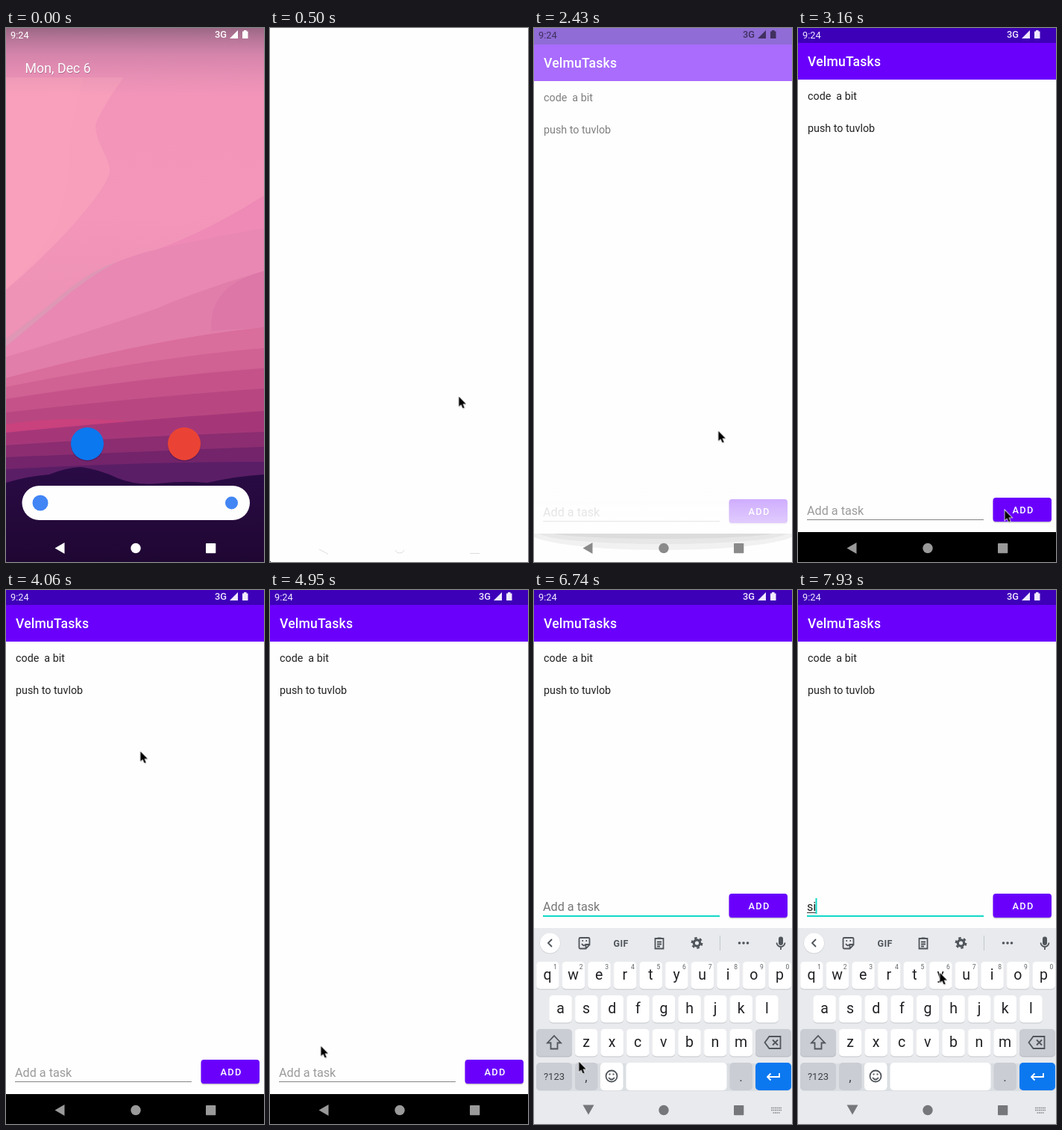
Animation of 346 by 714 pixels, one loop 8 s. Source, as an HTML page without scripts:

```html
<!DOCTYPE html>
<html lang="en">
<head>
<meta charset="utf-8">
<title>To-do app</title>
<style>
html, body { margin: 0; width: 100%; height: 100%; overflow: hidden; background: #fefefe; }
svg { display: block; width: 100vw; height: 100vh; font-family: Roboto, sans-serif; }
.line { fill: none; stroke: #50555b; stroke-width: 1.8; }
.med { font-weight: 500; }
.letters { font-size: 19.5px; fill: #202124; text-anchor: middle; }
.hints { font-size: 8.5px; fill: #5f6368; text-anchor: middle; }

.home, .ghost, .app, .fade, .status, .nav, .navbar, .back, .down,
.row, .hint, .rest, .focus, .typed, .keys, .cursor { animation: 8s step-end infinite; }

.home { animation-name: home; }
@keyframes home { 0% { opacity: 1; } 6.25%, 100% { opacity: 0; } }
.ghost { animation-name: ghost; }
@keyframes ghost { 0% { opacity: 0; } 6.25% { opacity: 1; } 8%, 100% { opacity: 0; } }

.app { animation-name: app; }
@keyframes app {
  0% { opacity: 0; }
  30.375% { opacity: .58; transform: translate(0, 2px); }
  32.25%, 100% { opacity: 1; transform: none; }
}
.fade { animation-name: fade; }
@keyframes fade { 0% { opacity: 0; } 30.375% { opacity: 1; } 32.25%, 100% { opacity: 0; } }

.status { animation-name: status; }
@keyframes status {
  0% { fill: #fff; }
  6.25% { fill: transparent; }
  13.625% { fill: #666; }
  30.375% { fill: #40305f; }
  32.25%, 100% { fill: #f1eaff; }
}
.nav { animation-name: nav; }
@keyframes nav {
  0% { fill: #fff; }
  6.25% { fill: transparent; }
  13.625% { fill: #8a8a8a; }
  32.25% { fill: #9a9a9a; }
  80.5%, 100% { fill: #75777a; }
}
.navbar { animation-name: navbar; }
@keyframes navbar {
  0% { fill: transparent; }
  32.25% { fill: #000; }
  80.5%, 100% { fill: #e8eaed; }
}
.back { animation-name: back; }
@keyframes back { 0% { opacity: 1; } 80.5%, 100% { opacity: 0; } }
.down { animation-name: down; }
@keyframes down { 0% { opacity: 0; } 80.5%, 100% { opacity: 1; } }

.row { animation-name: row; }
@keyframes row { 0% { transform: none; } 80.5%, 100% { transform: translate(0, -222px); } }
.hint { animation-name: hint; }
@keyframes hint {
  0% { fill: #9b9b9b; opacity: 1; }
  78.625% { fill: #777; opacity: 1; }
  99.125%, 100% { opacity: 0; }
}
.rest { animation-name: rest; }
@keyframes rest { 0% { opacity: 1; } 78.625%, 100% { opacity: 0; } }
.focus { animation-name: focus; }
@keyframes focus { 0% { opacity: 0; } 78.625%, 100% { opacity: 1; } }
.typed { animation-name: typed; }
@keyframes typed { 0% { opacity: 0; } 99.125%, 100% { opacity: 1; } }

.keys { animation-name: keys; }
@keyframes keys {
  0% { transform: translate(0, 270px); }
  80.5% { transform: translate(0, 110px); }
  82.375% { transform: translate(0, 20px); }
  84.25%, 100% { transform: none; }
}

.cursor { animation-name: cursor; }
@keyframes cursor {
  0% { transform: translate(-40px, 0); }
  6.25% { transform: translate(253px, 492px); }
  8% { transform: translate(251px, 508px); }
  13.625%, 30.375% { transform: translate(247px, 538px); }
  32.25% { transform: translate(249px, 556px); }
  34.125% { transform: translate(256px, 582px); }
  36% { transform: translate(266px, 612px); }
  37.625% { transform: translate(274px, 635px); }
  39.5% { transform: translate(277px, 644px); }
  41.375% { transform: translate(271px, 664px); }
  43.25% { transform: translate(258px, 681px); }
  45.125% { transform: translate(176px, 393px); }
  48.875% { transform: translate(183px, 300px); }
  50.75% { transform: translate(180px, 215px); }
  52.625% { transform: translate(160px, 179px); }
  54.5% { transform: translate(137px, 225px); }
  56.25% { transform: translate(112px, 340px); }
  58.125% { transform: translate(90px, 465px); }
  60% { transform: translate(74px, 565px); }
  61.875% { transform: translate(68px, 609px); }
  63.75% { transform: translate(63px, 634px); }
  65.625% { transform: translate(56px, 657px); }
  67.5% { transform: translate(51px, 651px); }
  69.25% { transform: translate(51px, 641px); }
  84.25% { transform: translate(60px, 630px); }
  86% { transform: translate(95px, 596px); }
  87.875% { transform: translate(140px, 555px); }
  89.75% { transform: translate(175px, 525px); }
  91.625%, 100% { transform: translate(190px, 511px); }
}
</style>
</head>
<body>
<svg viewBox="0 0 346 714">
  <defs>
    <linearGradient id="sky" x2="0" y2="1">
      <stop offset="0" stop-color="#f294b9"/>
      <stop offset=".35" stop-color="#f396b9"/>
      <stop offset=".5" stop-color="#ee92b6"/>
    </linearGradient>
    <linearGradient id="scrim" x2="0" y2="1">
      <stop offset="0" stop-color="#54445a" stop-opacity=".55"/>
      <stop offset=".4" stop-color="#8a5c86" stop-opacity=".28"/>
      <stop offset="1" stop-color="#b070a0" stop-opacity="0"/>
    </linearGradient>
    <linearGradient id="ground" x2="0" y2="1">
      <stop offset="0" stop-color="#2a0b45"/>
      <stop offset="1" stop-color="#1f0733"/>
    </linearGradient>
    <linearGradient id="veil" x2="0" y2="1">
      <stop offset="0" stop-color="#fefefe" stop-opacity=".35"/>
      <stop offset="1" stop-color="#fefefe" stop-opacity=".75"/>
    </linearGradient>
    <pattern id="caps" width="34.6" height="45" patternUnits="userSpaceOnUse">
      <rect x=".3" y="1" width="30.6" height="36.4" rx="5" fill="#c3c6ca"/>
      <rect x=".3" width="30.6" height="36.4" rx="5" fill="#fff"/>
    </pattern>
    <clipPath id="foot"><path d="M0 676H346V714H0z"/></clipPath>
  </defs>

  <rect width="346" height="714" fill="#fefefe"/>

  <g class="ghost" fill="none" stroke="#ddd">
    <path d="M66 697l12 6.500M168 698a6.500 6.500 0 0 0 12 0M268 702.500h13"/>
    <path d="M0 713.500h1" stroke="#222"/>
  </g>

  <g class="home">
    <rect width="346" height="714" fill="url(#sky)"/>
    <path d="M0 66H158Q134 98 121 126C116 150 142 175 139 194C130 225 60 300 0 350z" fill="#f79fbb"/>
    <path d="M0 66H105C88 120 84 150 84 190C78 260 60 290 0 350z" fill="#f9a1bc"/>
    <path d="M346 224Q270 272 200 297Q120 315 70 362L0 416V714H346z" fill="#ef89b6"/>
    <path d="M346 268Q260 283 190 299Q120 318 70 366L0 426V714H346z" fill="#e888b3"/>
    <path d="M150 312Q110 325 65 365L0 416V426L70 368Q105 336 150 312z" fill="#de97b5"/>
    <path d="M346 325Q260 350 200 376Q100 410 0 440V714H346z" fill="#e17ea9"/>
    <path d="M346 325Q270 345 276 405L346 400z" fill="#dc77a8"/>
    <path d="M346 400Q200 415 0 468V714H346z" fill="#d96d9b"/>
    <path d="M346 428Q200 440 0 480V714H346z" fill="#cf6193"/>
    <path d="M346 455Q200 465 0 496V714H346z" fill="#c5538a"/>
    <path d="M346 482Q200 492 0 514V714H346z" fill="#b84781"/>
    <path d="M0 530Q90 515 215 531Q120 548 0 541z" fill="#c9417d"/>
    <path d="M346 512Q200 522 0 541V714H346z" fill="#a53779"/>
    <path d="M346 540Q200 545 0 558V714H346z" fill="#8b2d70"/>
    <path d="M346 560Q190 566 0 574V714H346z" fill="#73246b"/>
    <path d="M346 580Q180 580 0 590V714H346z" fill="#5a1e66"/>
    <path d="M0 608Q30 599 58 597Q80 588 100 587Q125 590 150 602Q175 612 205 609Q240 605 270 608Q310 599 346 597V714H0z" fill="url(#ground)"/>
    <rect width="346" height="90" fill="url(#scrim)"/>
    <text x="26.100" y="61" font-size="17.800" fill="#7a4668" opacity=".5">Mon, Dec 6</text>
    <text x="25.600" y="60" font-size="17.800" fill="#fff">Mon, Dec 6</text>
    <g fill="#1a0430" opacity=".25">
      <circle cx="109" cy="557.500" r="22"/>
      <circle cx="239" cy="557.500" r="22"/>
    </g>
    <circle cx="109" cy="556" r="22" fill="#0b78f0"/>
    <circle cx="239" cy="556" r="22" fill="#ea4335"/>
    <rect x="21.500" y="612" width="305.500" height="46" rx="23" fill="#fefefe"/>
    <circle cx="46" cy="635" r="10.500" fill="#4285f4"/>
    <circle cx="302.500" cy="635" r="8.500" fill="#4285f4"/>
  </g>

  <g class="fade" clip-path="url(#foot)">
    <ellipse cx="173" cy="674" rx="180" ry="24" fill="#f1f1f1"/>
    <ellipse cx="173" cy="674" rx="168" ry="16" fill="#e7e7e7"/>
    <ellipse cx="173" cy="674" rx="150" ry="9" fill="#dcdcdc"/>
  </g>

  <g class="app">
    <rect y="69" width="346" height="605" fill="#fefefe"/>
    <rect y="-2" width="346" height="22" fill="#3d00b8"/>
    <rect y="20" width="346" height="49" fill="#6a00fc"/>
    <text class="med" x="13" y="51" font-size="17.600" letter-spacing=".2" fill="#fff">VelmuTasks</text>
    <g font-size="14.300" fill="#222">
      <text x="13" y="96">code&#160; a bit</text>
      <text x="13" y="139">push to tuvlob</text>
    </g>
    <g class="row">
      <text class="hint" x="12" y="651" font-size="16.200">Add a task</text>
      <rect class="rest" x="12" y="657" width="237" height="1" fill="#868686"/>
      <rect class="focus" x="12" y="657" width="237" height="2" fill="#12d8c8"/>
      <g class="typed">
        <text x="12" y="651" font-size="16.200" fill="#222">si</text>
        <rect x="12" y="653" width="12" height="1" fill="#333"/>
        <rect x="23.500" y="634" width="2" height="21" fill="#12d8c8"/>
      </g>
      <rect x="261.500" y="629.500" width="78.500" height="32" rx="4" fill="#c9c5d0"/>
      <rect x="261.500" y="628" width="78.500" height="32" rx="4" fill="#6a00fc"/>
      <text class="med" x="287.500" y="649" font-size="12.800" letter-spacing="1.300" fill="#fff">ADD</text>
    </g>
  </g>
  <rect class="fade" y="615" width="346" height="61" fill="url(#veil)"/>

  <g class="keys">
    <rect y="452" width="346" height="262" fill="#e8eaed"/>
    <circle cx="21.500" cy="472.500" r="14" fill="#d2d4d8"/>
    <circle cx="21.500" cy="472" r="13.500" fill="#fff"/>
    <g class="line">
      <path d="M24 467l-5 5 5 5"/>
      <path d="M62 465h11q1.500 0 1.500 1.500v8l-5 5h-7.500q-1.500 0-1.500-1.500v-11.500q0-1.500 1.500-1.500zM74 474h-4.500v5M64 473q2.500 4 5 1M64.500 469h1.500M69.500 469h1.500"/>
      <path d="M162.500 466h11v13.500h-11zM165 470.500h6M165 473.500h6M165 476.500h4M165.500 465.500h5"/>
      <circle cx="218.500" cy="472" r="4.200" style="stroke-width: 3.2"/>
      <circle cx="218.500" cy="472" r="6.700" style="stroke-width: 2.4" stroke-dasharray="3.500"/>
      <path d="M249.500 462v20" style="stroke: #c4c7cc; stroke-width: 1"/>
      <path d="M325.500 471.500a5.500 5.500 0 0 0 11 0M331 477v4"/>
    </g>
    <g fill="#50555b">
      <text x="106.500" y="476.500" font-size="12.500" font-weight="700" letter-spacing=".4">GIF</text>
      <circle cx="275.500" cy="472" r="1.800"/>
      <circle cx="281" cy="472" r="1.800"/>
      <circle cx="286.500" cy="472" r="1.800"/>
      <rect x="328" y="463.500" width="6" height="11.500" rx="3"/>
    </g>

    <rect width="346" height="38" fill="url(#caps)" transform="translate(2.700 497)"/>
    <rect width="311.400" height="38" fill="url(#caps)" transform="translate(20 542)"/>
    <rect width="242.200" height="38" fill="url(#caps)" transform="translate(54.500 587)"/>
    <g class="letters">
      <text y="521" x="18 52.600 87.200 121.800 156.400 191 225.600 260.200 294.800 329.400">qwertyuiop</text>
      <text y="566" x="35.500 70.100 104.700 139.300 173.900 208.500 243.100 277.700 312.300">asdfghjkl</text>
      <text y="611" x="70 104.600 139.200 173.800 208.400 243 277.600">zxcvbnm</text>
    </g>
    <text class="hints" y="507" x="28.500 63.100 97.700 132.300 166.900 201.500 236.100 270.700 305.300 339.900">1234567890</text>

    <g fill="#b4b8be">
      <rect x="3" y="588" width="48" height="36.400" rx="5"/>
      <rect x="297" y="588" width="48" height="36.400" rx="5"/>
      <rect x="3" y="633" width="342" height="37" rx="5" opacity=".25"/>
    </g>
    <g fill="#cacdd4">
      <rect x="3" y="587" width="48" height="36.400" rx="5"/>
      <rect x="297" y="587" width="48" height="36.400" rx="5"/>
      <rect x="3" y="632" width="48" height="37" rx="5"/>
      <rect x="55" y="632" width="30.500" height="37" rx="5"/>
      <rect x="262.500" y="632" width="30.500" height="37" rx="5"/>
    </g>
    <g fill="#fff">
      <rect x="89" y="632" width="30.500" height="37" rx="5"/>
      <rect x="123.500" y="632" width="135" height="37" rx="5"/>
    </g>
    <rect x="297" y="632" width="48" height="37" rx="5" fill="#0b78f0"/>
    <g class="line">
      <path d="M27 596l9 9.500h-4.500v8h-9v-8h-4.500z"/>
      <path d="M309.500 605l6-8h15v16h-15zM320 601.500l7 7M327 601.500l-7 7"/>
      <circle cx="104" cy="650" r="7.500"/>
      <path d="M100 652q4 5 8 0M100.500 647.500h2M105.500 647.500h2"/>
      <path d="M329 646v5h-16M317.500 646.500l-4.500 4.500 4.500 4.500" style="stroke: #fff"/>
    </g>
    <g fill="#3c4043">
      <text x="27" y="655" font-size="13" text-anchor="middle">?123</text>
      <text x="70" y="657" font-size="17" text-anchor="middle">,</text>
      <text x="277.500" y="657" font-size="17" text-anchor="middle">.</text>
    </g>
  </g>

  <rect class="navbar" y="674" width="346" height="40"/>
  <g class="nav">
    <path class="back" d="M65.500 695.500l13-7.500v15z"/>
    <g class="down">
      <path d="M65.500 688.500h15l-7.500 13z"/>
      <path d="M318 692.500h14M318 695.500h14M320.500 699h9" stroke="#85888c" stroke-width="1.600" stroke-dasharray="1.700 .8"/>
    </g>
    <circle cx="174" cy="695.500" r="6.700"/>
    <rect x="268" y="689" width="13.300" height="13.300" rx=".8"/>
  </g>

  <g class="status">
    <text x="6" y="13.500" font-size="12.800">9:24</text>
    <text class="med" x="280" y="13.200" font-size="12.800">3G</text>
    <path d="M300 14h11V3z"/>
    <path d="M317 4.500h2V3h3.500v1.500h2V14H317z"/>
  </g>

  <g class="cursor">
    <g transform="translate(.3 .8) scale(.92)">
      <path d="M.5 1.500V16l3.300-3 2.500 5.500 2.500-1L6.500 12h4.500z" fill="#000" opacity=".2"/>
      <path d="M0 0V14.500L3.300 11.500 5.700 17 8 16 5.700 10.700H10.300z" stroke="#fff" stroke-width="1.600" paint-order="stroke"/>
    </g>
  </g>
</svg>
</body>
</html>
```
